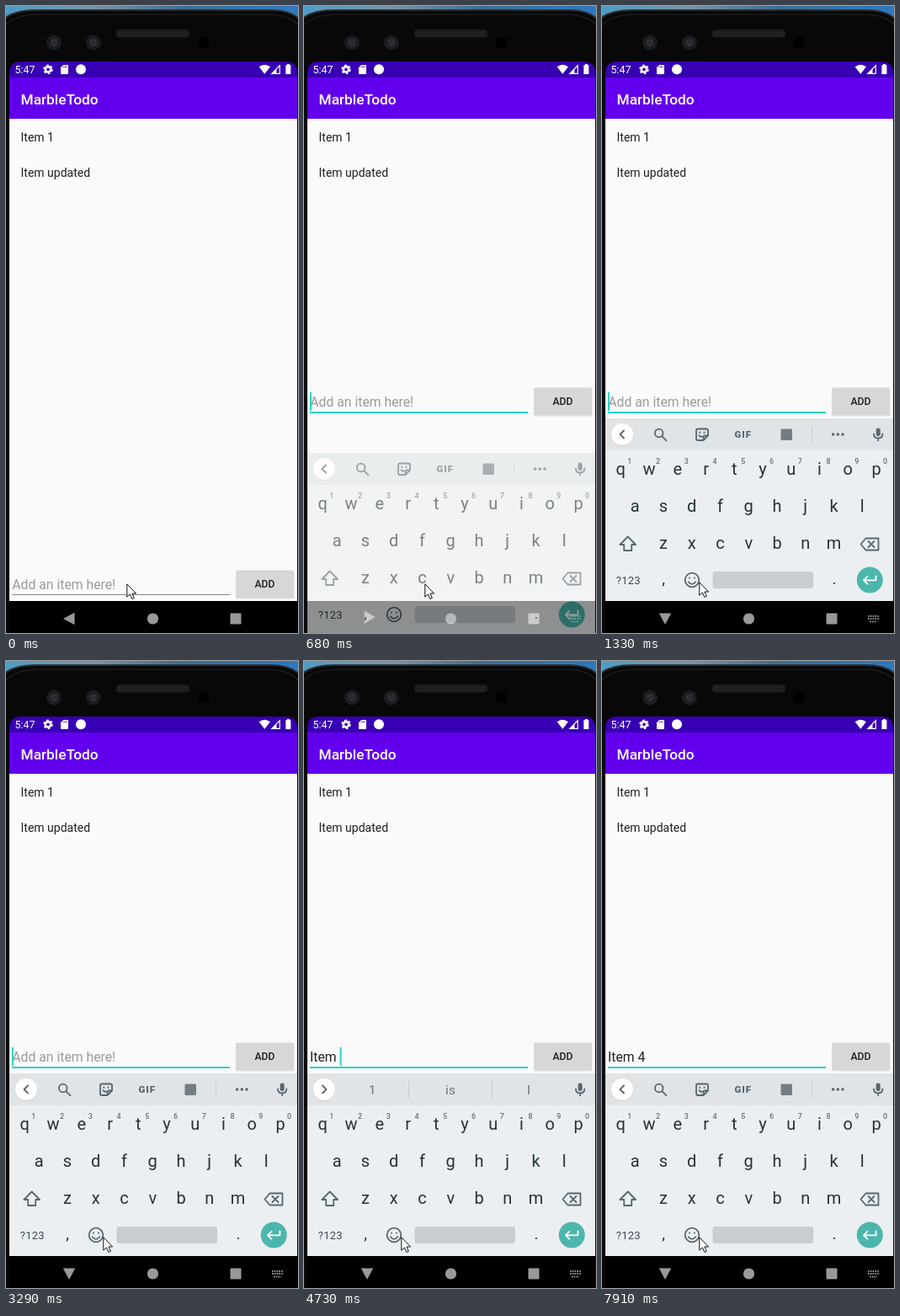
Write an HTML page that moves like this. It is 347 by 745 pixels and loops after 8 s.

```html
<!DOCTYPE html>
<html lang="en">
<head>
<meta charset="utf-8">
<title>Todo list</title>
<style>
html, body { margin: 0; width: 100%; height: 100%; overflow: hidden; background: #000; }
svg { display: block; }
text { font-family: Roboto, "Noto Sans", sans-serif; white-space: pre; }
.mid { text-anchor: middle; }
.line { fill: none; stroke: #59666d; stroke-width: 1.8; stroke-linejoin: round; stroke-linecap: round; }

/* every change is a hard cut on one 8 s clock */
.a { animation: 8s step-end infinite; }
.field { animation-name: field; }
.focus { animation-name: focus; }
.hint { animation-name: hint; }
.typed { animation-name: typed; }
.wrap { animation-name: wrap; }
.move { animation-name: move; }
.compose { animation-name: compose; }
.caret { animation-name: blink; }
.board { animation-name: board; }
.tools { animation-name: tools; }
.words { animation-name: words; }
.strip { animation-name: strip; }
.chev { animation-name: chev; transform-origin: 24px 509px; }
.back { animation-name: back; transform-origin: 75px 728px; }
.ime { animation-name: ime; }
.mouse { animation-name: mouse; }

@keyframes field { 0% { transform: translateY(217px); } 7%, 100% { transform: none; } }
@keyframes focus { 0% { opacity: 0; } 5.125%, 100% { opacity: 1; } }
@keyframes hint { 0% { opacity: 1; } 52.5%, 100% { opacity: 0; } }
@keyframes typed { 0% { opacity: 0; } 52.5%, 100% { opacity: 1; } }
@keyframes wrap {
  0%, 93.875%, 100% { transform: none; }
  73.75% { transform: translateY(-18.4px); }
}
@keyframes move {
  0%, 73.75% { transform: none; }
  52.5% { transform: translateX(4px); }
  54.375% { transform: translateX(9.2px); }
  55.875% { transform: translateX(17.6px); }
  57.375% { transform: translateX(31.4px); }
  59.125% { transform: translateX(35.6px); }
  62.25%, 93.875%, 100% { transform: translateX(44.4px); }
}
@keyframes compose { 0%, 59.125%, 100% { opacity: 0; } 52.5% { opacity: 1; } }
@keyframes blink {
  0%, 10.25%, 21.375%, 34.5%, 47.75%, 68.75%, 80.375%, 98.875%, 100% { opacity: 0; }
  5.125%, 16.625%, 28%, 41.125%, 52.5%, 73.75%, 87% { opacity: 1; }
}
@keyframes board {
  0% { opacity: 0; transform: translateY(100px); }
  7% { opacity: .15; transform: translateY(78px); }
  8.5% { opacity: .6; transform: translateY(41px); }
  10.25% { opacity: .92; transform: translateY(9px); }
  11.75%, 100% { opacity: 1; transform: none; }
}
@keyframes tools { 0%, 63.75%, 100% { opacity: 1; } 52.5% { opacity: 0; } }
@keyframes words { 0%, 63.75%, 100% { opacity: 0; } 52.5% { opacity: 1; } }
@keyframes strip {
  0% { transform: none; }
  54.375% { transform: translateY(-40px); }
  55.875% { transform: translateY(-80px); }
  57.375% { transform: translateY(-120px); }
  59.125%, 100% { transform: translateY(-160px); }
}
@keyframes chev { 0%, 63.75%, 100% { transform: none; } 52.5% { transform: rotate(180deg); } }
@keyframes back {
  0% { transform: none; }
  7% { transform: rotate(-20deg); }
  8.5% { transform: rotate(-60deg); }
  10.25% { transform: rotate(-86deg); }
  11.75%, 100% { transform: rotate(-90deg); }
}
@keyframes ime { 0% { opacity: 0; } 8.5%, 100% { opacity: 1; } }
@keyframes mouse {
  0% { transform: translate(143px, 686px); }
  14.875% { transform: translate(116px, 685px); }
  16.625%, 100% { transform: translate(115px, 684px); }
}
</style>
</head>
<body>
<svg width="347" height="745" viewBox="0 0 347 745">
  <defs>
    <linearGradient id="sky">
      <stop offset="0" stop-color="#4f9cc4"/>
      <stop offset=".3" stop-color="#7793a5"/>
      <stop offset=".6" stop-color="#3f6d92"/>
      <stop offset="1" stop-color="#2e79bd"/>
    </linearGradient>
    <clipPath id="screen"><path d="M4 745V80Q4 66 18 66H332Q346 66 346 80V745Z"/></clipPath>
  </defs>

  <!-- phone -->
  <rect width="347" height="24" fill="url(#sky)"/>
  <path d="M-2 747V15Q10 5 36 5H314Q338 5 349 16V747Z" fill="#080808" stroke="#2b2c2e" stroke-width="2"/>
  <path d="M-2 24Q12 10 38 10H312Q336 10 349 24" fill="none" stroke="#1b1b1c" stroke-width="1.5"/>
  <rect x="131" y="28" width="87" height="9.5" rx="4" fill="#1d1d1d"/>
  <path d="M134 31.5H215M134 34.5H215" stroke="#2c2c2c" stroke-width="1.2" stroke-dasharray="1.5 1.5"/>
  <g id="lenses"></g>
  <circle cx="234.5" cy="43.5" r="6.8" fill="#000"/>

  <g clip-path="url(#screen)">
    <rect x="4" y="66" width="342" height="20" fill="#3700b3"/>
    <rect x="4" y="85" width="342" height="49" fill="#6200ee"/>
    <rect x="4" y="134" width="342" height="573" fill="#fafafa"/>
    <rect x="4" y="707" width="342" height="38" fill="#000"/>

    <!-- status bar -->
    <g fill="#fff">
      <text x="10.5" y="80" font-size="12.4">5:47</text>
      <circle cx="50" cy="75.3" r="3.2" fill="none" stroke="#fff" stroke-width="2.6"/>
      <circle cx="50" cy="75.3" r="4.9" fill="none" stroke="#fff" stroke-width="1.8" stroke-dasharray="2.6 2.53"/>
      <path d="M65 73.2L68.2 70H73Q74 70 74 71V79.8Q74 81 73 81H66Q65 81 65 80Z"/>
      <path d="M68.7 71.3V73.4M70.4 71.3V73.4M72.1 71.3V73.4" stroke="#3700b3" stroke-width=".8"/>
      <circle cx="89" cy="75.3" r="6"/>
      <path d="M307.3 80.8L300.7 72.3Q307.3 67.2 314 72.3Z"/>
      <path d="M315.8 80.3L325.3 70.8V80.3Z" fill="none" stroke="#fff" stroke-width="1.2"/>
      <path d="M315.5 80.6L321.5 74.6V80.6Z"/>
      <path d="M334 70.3V69H337V70.3H338.4V81H332.4V70.3Z"/>
    </g>

    <text x="17.5" y="117" font-size="17.3" font-weight="500" fill="#fff">MarbleTodo</text>
    <g font-size="14" fill="#212121">
      <text x="17.5" y="161">Item 1</text>
      <text x="17.5" y="202.7">Item updated</text>
    </g>

    <!-- entry row -->
    <g class="a field">
      <rect x="273" y="454.5" width="69.5" height="33" rx="2" fill="#dedede"/>
      <rect x="273" y="453.5" width="69" height="32.5" rx="2" fill="#d6d7d7"/>
      <text class="mid" x="307.5" y="474" font-size="12.25" font-weight="500" fill="#212121">ADD</text>
      <g font-size="15.75">
        <text class="a hint" x="7.3" y="476" fill="#9b9b9b">Add an item here!</text>
        <g class="a typed">
          <g class="a wrap"><text x="7" y="476" fill="#212121">Item 4</text></g>
          <rect class="a compose" x="7" y="478" width="32" height="1" fill="#212121"/>
          <rect class="a move" x="7" y="460" width="60" height="21" fill="#fafafa"/>
        </g>
      </g>
      <rect x="7" y="482" width="259" height="1" fill="#858585"/>
      <rect class="a focus" x="7" y="482" width="259" height="2" fill="#1fd6c6"/>
      <g class="a move"><rect class="a caret" x="7" y="459" width="1.9" height="22" fill="#1fd6c6"/></g>
    </g>

    <!-- navigation bar -->
    <g fill="#999">
      <path class="a back" d="M68 728L81.5 720.8V735.2Z"/>
      <circle cx="174.5" cy="728" r="6.6"/>
      <rect x="266.5" y="721.5" width="13" height="13" rx="1"/>
      <path class="a ime" d="M316 725H329M316 728H329M318 731.5H327" fill="none" stroke="#999" stroke-width="1.8" stroke-dasharray="1.6 1.2"/>
    </g>

    <!-- keyboard -->
    <g class="a board">
      <rect x="4" y="490" width="342" height="217" fill="#ebeff1"/>
      <rect x="4" y="490" width="342" height="38" fill="#e0e4e7"/>
      <circle cx="24" cy="509.7" r="13.3" fill="#cfd3d6"/>
      <circle cx="24" cy="509" r="13" fill="#fff"/>
      <path class="a chev line" d="M26 504.5L21.5 509L26 513.5"/>

      <g class="a tools">
        <circle class="line" cx="67.7" cy="507.5" r="4.8"/>
        <path class="line" d="M71.5 511.3L76.5 516.3" stroke-width="2.2"/>
        <path class="line" d="M114 502.5H124Q126 502.5 126 504.5V510.5L120.5 516H114Q112 516 112 514V504.5Q112 502.5 114 502.5ZM120.5 516V512.5Q120.5 510.5 122.5 510.5H126" stroke-width="1.5"/>
        <path class="line" d="M116.3 506.5V507M121.5 506.5V507M115.5 510.2Q117 512.4 119 511.5" stroke-width="1.4"/>
        <text x="157.5" y="513" font-size="11.5" font-weight="900" letter-spacing="1" fill="#59666d">GIF</text>
        <rect x="212.5" y="502.5" width="13.5" height="13.5" rx="1.5" fill="#737e84"/>
        <path d="M249.5 499.5V518.5" stroke="#c8ced2"/>
        <g fill="#59666d">
          <circle cx="274.6" cy="509" r="1.8"/><circle cx="280.3" cy="509" r="1.8"/><circle cx="286" cy="509" r="1.8"/>
        </g>
      </g>

      <g class="a words">
        <path d="M124.5 499V519M223.5 499V519" stroke="#c3c9cd"/>
        <svg x="0" y="490" width="347" height="38" overflow="hidden"><g class="a strip" id="strip"></g></svg>
      </g>

      <rect x="325.7" y="501.5" width="5" height="9.5" rx="2.5" fill="#59666d"/>
      <path class="line" d="M323 508.5Q323 513.5 328.2 513.5Q333.4 513.5 333.4 508.5M328.2 513.5V516.3" stroke-width="1.6"/>

      <g id="keys" fill="#263238"></g>
      <path class="line" d="M30.7 630.5L40 640H35.2V647H26.2V640H21.4Z"/>
      <path class="line" d="M313.5 632.5H328.5V646.5H313.5L307.5 639.5ZM316.5 636L323.5 643M323.5 636L316.5 643"/>
      <text x="16.8" y="686.5" font-size="13" letter-spacing=".2" fill="#37474f">?123</text>
      <circle class="line" cx="107" cy="682" r="8.3"/>
      <path class="line" d="M104 679.3V679.8M110 679.3V679.8M102.7 684.2Q107 689.5 111.3 684.2"/>
      <rect x="131.5" y="672" width="119.5" height="20" rx="3" fill="#c8cdd0"/>
      <circle cx="318.3" cy="682" r="15.5" fill="#4db6ac"/>
      <path class="line" d="M325.5 677.5V682.3H311.5M315.5 677.8L311 682.3L315.5 686.8" style="stroke:#fff"/>
    </g>
  </g>

  <g class="a mouse">
    <path d="M.8 .8V16.2L4.4 12.9L6.9 18.5L9.3 17.4L6.9 12H11.6Z" fill="#fff" stroke="#111" stroke-width="1"/>
  </g>
</svg>
<script>
const byId = id => document.getElementById(id);
const label = (s, x, y, size, extra = '') =>
  `<text class="mid" x="${x}" y="${y}" font-size="${size}" ${extra}>${s}</text>`;

// letter rows: text, first x, baseline
const pitch = 33.75;
const rows = [['qwertyuiop', 22.3, 557], ['asdfghjkl', 39.2, 601], ['zxcvbnm', 73, 645]];
let keys = label(',', 73, 687, 19) + label('.', 276, 687, 19);
rows.forEach(([letters, x0, y], row) => [...letters].forEach((c, i) => {
  const x = x0 + i * pitch;
  keys += label(c, x, y, 20);
  if (row === 0) keys += label((i + 1) % 10, x + 10.5, 543.5, 9, 'fill="#66737a" font-weight="500"');
}));
byId('keys').innerHTML = keys;

// suggestions, one line for each typed letter
const words = [['It', 'I', 'Is'], ['Its', 'It', 'It’s'], ['Items', 'Item', 'Iterate'],
  ['Items', 'Item', 'Itemized'], ['1', 'is', 'I']];
byId('strip').innerHTML = words.map((line, n) => line.map((w, i) =>
  label(w, [81, 174, 267][i], 25 + n * 40, 15.5, 'fill="#6b777d"')).join('')).join('');

// front cameras
byId('lenses').innerHTML = [57, 103.8].map(x =>
  `<circle cx="${x}" cy="43.5" r="9" fill="#1b1c1f"/>
   <circle cx="${x}" cy="43.5" r="5" fill="#26282c"/>
   <path d="M${x - 3} 42h1.5M${x + 1.5} 41h1.5M${x - 1} 46h1.5M${x + 2} 45h1" stroke="#555a62" stroke-width="1.2"/>`).join('');
</script>
</body>
</html>
```
